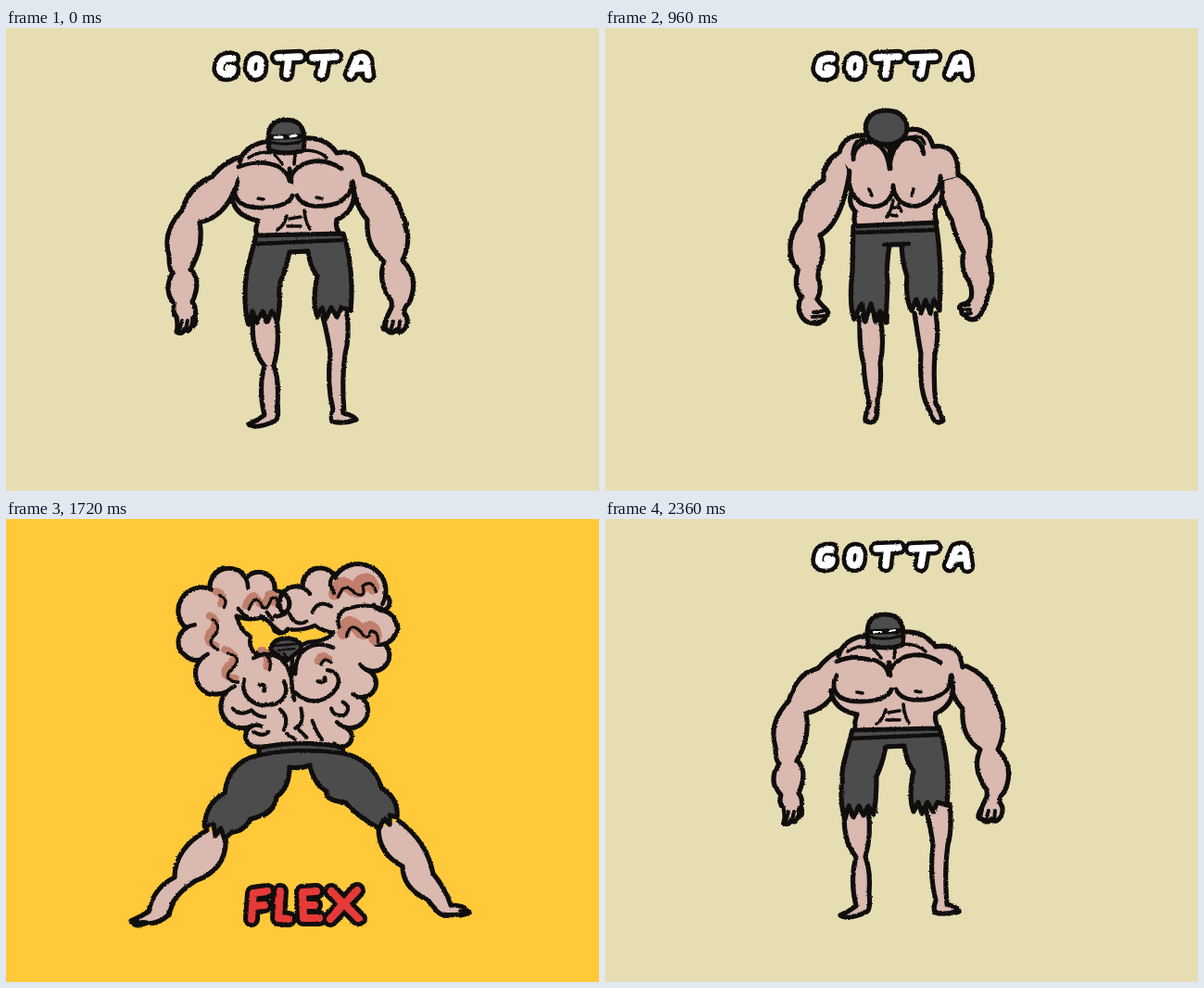
Recreate the animation shown at these times as an HTML page. Size 640 px wide and 500 px high, loop 2440 ms.

```html
<!DOCTYPE html>
<html lang="en">
<head>
<meta charset="utf-8">
<title>Gotta flex</title>
<style>
html, body { margin: 0; width: 100%; height: 100%; overflow: hidden; background: #e6ddb3; }
svg { display: block; width: 100%; height: 100%; }
path { stroke-linecap: round; stroke-linejoin: round; }
</style>
</head>
<body>
<svg viewBox="0 0 640 500" role="img" aria-label="Gotta flex">
  <defs>
    <filter id="crayon" filterUnits="userSpaceOnUse" x="0" y="0" width="640" height="500" color-interpolation-filters="sRGB">
      <feTurbulence id="wave" type="fractalNoise" baseFrequency=".03" numOctaves="1" result="wave"/>
      <feTurbulence id="grain" type="fractalNoise" baseFrequency=".5" numOctaves="1" result="grain"/>
      <feDisplacementMap in="SourceGraphic" in2="wave" scale="2.5" xChannelSelector="R" yChannelSelector="G" result="soft"/>
      <feDisplacementMap in="soft" in2="grain" scale="2.4" xChannelSelector="R" yChannelSelector="G"/>
    </filter>
  </defs>
  <rect id="back" width="640" height="500"/>
  <g id="art" filter="url(#crayon)"></g>
</svg>
<script>
const LOOP = 2440;
const INK = '#100e0d', SKIN = '#d9b9b0', GREY = '#4c4c4c', VEIN = '#c07f6c';
const BEIGE = '#e6ddb3', YELLOW = '#ffc93a', RED = '#e63a38';
const $ = id => document.getElementById(id);

// Drawing helpers
const shape = (d, fill, w = 5.2) => `<path d="${d}" fill="${fill}" stroke="${INK}" stroke-width="${w}"/>`;
const line = (d, w = 4.4, color = INK) => `<path d="${d}" fill="none" stroke="${color}" stroke-width="${w}"/>`;
const move = (x, y, s) => `<g transform="translate(${x} ${y})">${s}</g>`;
const lettering = (d, color, w, edge) => line(d, w + edge, INK) + line(d, w, color);

// Blend two paths that share the same commands
function mix([a, b], k) {
  const to = b.match(/-?[\d.]+/g);
  let i = 0;
  return a.replace(/-?[\d.]+/g, n => (+n + (to[i++] - n) * k).toFixed(1));
}

// Clockwise corner points joined by round bumps, each curling inward at its end
function bumps(text, curl) {
  const n = text.split(' ').map(Number);
  let d = `M${n[0]} ${n[1]}`, curls = '';
  for (let i = 2; i < n.length; i += 2) {
    const [px, py, x, y] = n.slice(i - 2, i + 2);
    const r = .51 * Math.hypot(x - px, y - py);
    const cx = (px + x) / 2 - (y - py) * .1, cy = (py + y) / 2 + (x - px) * .1;
    const a = Math.atan2(y - cy, x - cx) + curl / r;
    d += `A${r} ${r} 0 0 1 ${x} ${y}`;
    curls += `M${x} ${y}A${r} ${r} 0 0 1 ${cx + r * Math.cos(a)} ${cy + r * Math.sin(a)}`;
  }
  return shape(d + 'Z', SKIN, 5) + line(curls);
}

// Standing figure: upright and slumped
const stand = {
  armL: [
    'M262 138Q240 139 222 161Q198 169 190 197Q168 220 176 246Q176 262 180 264Q169 284 182 298Q179 306 184 312Q186 322 184 328Q190 332 193 325Q197 330 200 322Q206 322 204 312Q206 302 201 296Q208 280 205 270Q202 262 199 261Q214 236 209 210Q238 204 250 166Z',
    'M258 132Q234 142 236 164Q211 180 211 208Q193 230 204 256Q209 260 208 263Q203 280 212 291Q206 302 212 311Q216 319 226 319Q232 320 233 317Q238 316 238 311Q243 310 239 304Q234 300 229 293Q235 280 230 270Q230 264 231 260Q239 240 232 224Q255 212 264 156Z'],
  fingersL: [
    'M190 316L187 327M196 316L194 325M201 313L201 321',
    'M225 307L239 305M224 312L237 311M226 317L233 317'],
  armR: [
    'M378 156Q418 164 427 200Q440 226 428 251Q447 270 435 297Q429 302 430 308Q435 314 432 322Q426 332 421 326Q416 332 411 326Q404 326 409 317Q413 308 416 302Q417 294 414 292Q400 270 409 251Q388 238 390 207Q376 192 374 165Z',
    'M381 158Q404 172 408 205Q420 222 414 245Q422 270 413 290Q411 300 407 306Q404 314 396 315Q390 314 389 310Q384 310 385 305Q380 300 387 298Q392 297 395 292Q397 284 393 274Q383 260 387 242Q378 225 374 207Q362 190 364 163Z'],
  fingersR: [
    'M411 316L409 324M418 317L415 327M425 317L424 327',
    'M385 299L393 299M386 304L394 304M389 309L395 308'],
  legL: [
    'M267 312Q263 345 279 365Q272 390 279 418Q271 424 262 428Q270 434 291 424Q295 420 293 405Q295 380 289 365Q296 340 292 314',
    'M275 312Q274 345 279 362Q280 385 286 408Q280 418 281 424Q288 428 292 423Q295 415 294 402Q299 385 297 362Q302 340 297 312'],
  legR: [
    'M342 312Q348 335 350 352Q346 385 353 412Q350 420 352 425Q365 428 378 423Q376 419 365 416Q362 380 366 352Q371 335 368 308',
    'M334 308Q338 335 341 352Q339 385 346 404Q351 415 356 424Q360 428 365 424Q364 415 357 406Q354 380 356 352Q361 335 357 308'],
  shorts: [
    'M270 224L364 222Q376 260 372 305L362 302L357 312L351 302L345 314L341 302L336 312Q330 295 336 268Q328 258 326 241L306 242Q302 262 296 274Q296 300 293 315L287 306L282 316L277 306L271 318L266 306L262 320Q255 300 260 262Z',
    'M268 214L357 210Q364 250 361 305L355 294L351 308L346 294L341 308L336 293L331 305Q324 295 326 268Q321 255 320 234L307 234Q303 262 305 274Q304 300 303 318L297 306L292 316L287 298L281 316L277 298L269 314Q263 300 267 262Z'],
  belt: ['M270 233L364 229M306 242L326 241', 'M269 221L358 218M301 234L328 233'],
  torso: [
    'M250 150Q258 124 284 122L322 119Q346 118 357 135Q382 130 386 158L374 168Q381 196 357 207Q354 215 363 226L270 228Q276 214 270 208Q243 202 244 182L250 166Z',
    'M252 136Q258 114 280 116L327 110Q348 106 354 128Q382 124 381 160L362 165Q367 190 357 193Q352 203 356 211L270 213Q272 203 270 200Q268 190 266 180L264 155Z'],
  sides: [
    'M252 145Q257 126 284 122M322 119Q346 118 357 135Q382 130 386 157M374 166Q381 196 357 207M357 207Q355 215 360 222M244 182Q246 203 272 208Q268 218 271 224',
    'M253 134Q258 115 280 116M327 110Q348 106 354 128Q382 124 381 159M362 165Q368 190 357 193M357 193Q355 203 358 210M266 178Q262 190 270 198Q268 206 270 212'],
  chest: [
    'M250 151C270 142 302 146 306 165C312 142 342 138 362 152M249 166C240 190 262 195 278 194C296 194 307 188 309 181M314 181C320 194 336 193 345 192C362 190 373 182 373 167M306 152L308 166',
    'M268 142C268 118 303 112 307 152C310 112 340 110 344 136M264 155C260 180 276 193 290 193C304 192 311 182 311 170M311 170C312 186 324 194 338 192C352 188 362 174 362 160M307 130L308 152'],
  marks: [
    'M272 184L278 185M335 183L341 184M303 203Q300 214 293 218M322 197Q323 210 328 217M306 206L318 204M304 214L318 214M262 140Q275 132 285 135M322 132Q338 132 346 140M290 137L298 147M312 137L311 147',
    'M285 174L288 181M333 174L331 181M311 186Q309 198 304 204M317 190Q317 194 320 198M310 194L316 194M309 202L315 203M267 137Q268 120 280 120M327 120Q340 112 345 125M300 124L304 129M312 126L308 130'],
  head: [
    'M284 132C281 110 285 99 302 99C320 99 324 112 321 132Q303 138 284 132Z',
    'M285 119C276 105 284 89 303 89C324 89 331 106 322 119Q304 133 285 119Z']
};
const GOTTA = 'M245 33Q232 31 231 42Q229 50 238 50Q245 50 245 44L240 43M270 33Q264 34 264 42Q263 50 270 50Q275 49 275 41Q276 33 270 33M293 32L317 31M305 32L303 50M331 32L356 31M344 32L341 50M372 50L379 33Q386 29 389 35L391 51M376 44L389 43';

// k: slump, s: sway, lid: eye opening
function standing(k, s = 0, lid = 3) {
  const p = {};
  for (const name in stand) p[name] = mix(stand[name], k);
  const eyes = k > .45 ? '' :
    line('M288 118L317 117', 6) + line('M290 118L298 118M307 117L313 116', lid, '#fff') + line('M285 123Q302 128 320 122', 3);
  return move(8 * s, 0, shape(p.armL, SKIN) + line(p.fingersL, 4)) +
    move(-4 * s, -2 * s, shape(p.armR, SKIN) + line(p.fingersR, 4)) +
    move(-8 * s, 0, shape(p.legL, SKIN)) +
    move(4 * s, 0, shape(p.legR, SKIN)) +
    move(0, 3 * s, `<path d="${p.torso}" fill="${SKIN}"/>` + line(p.sides, 5.2)) +
    move(-3 * s, 4 * s, shape(p.shorts, GREY) + line(p.belt)) +
    move(0, 4 * s, shape(p.head, GREY) + eyes) +
    move(0, 3 * s, line(p.chest, 4.8) + line(p.marks, 3.6)) +
    lettering(GOTTA, '#fff', 7.5, 9);
}

// Flexing figure: arms raised and crouched
const wide = {
  legL: [
    'M217 336Q182 356 182 387Q159 398 154 424Q144 430 135 434Q140 442 152 437Q165 437 175 428Q178 408 204 391Q240 378 237 342',
    'M186 346Q166 365 168 384Q150 398 152 418Q136 424 128 429Q134 437 146 434Q158 432 161 426Q164 412 187 392Q206 370 208 348'],
  legR: [
    'M402 334Q402 362 428 375Q428 398 454 411Q464 425 472 428Q490 430 500 425Q495 418 480 418Q474 398 461 383Q454 348 424 326',
    'M426 328Q428 357 454 368Q460 396 480 408Q486 424 494 427Q506 428 514 423Q508 416 496 414Q486 395 467 363Q462 340 444 320'],
  shorts: [
    'M273 247Q318 238 363 246L364 253Q396 260 405 290Q424 302 422 322L414 320L414 330L408 324L403 334Q380 322 366 306Q344 304 346 294Q332 286 328 266Q318 270 306 268Q306 290 292 300Q290 318 264 324Q256 338 244 338L236 346L232 334L226 342L224 330L214 332Q216 306 236 296Q240 262 273 255Z',
    'M300 266Q318 260 336 264L345 271Q400 264 425 285Q446 298 444 322L436 316L432 328L424 318L415 328Q400 312 378 308Q362 304 352 295Q342 296 328 290Q318 295 306 290Q296 298 278 302Q262 320 236 324Q218 330 216 342L208 348L204 338L196 346L190 336L182 343Q186 310 204 300Q225 285 290 272Z'],
  belt: ['M274 255Q318 246 363 253', 'M305 266Q318 260 332 266'],
  toes: ['M137 434L150 436M490 424L499 425', 'M130 430L141 433M504 422L512 423']
};
const RAISED = bumps('272 246 266 224 240 187 212 153 197 119 222 77 260 66 290 80 300 104 320 76 354 64 407 84 402 100 406 136 388 164 382 193 364 225 362 246', 10);
const HOLE = 'M250 106Q262 112 276 108Q288 112 290 122Q298 128 304 120Q318 123 333 116Q340 122 352 124Q346 133 326 134Q314 138 306 150Q282 148 270 147Q262 138 265 128Q254 122 250 106Z';
const VEINS = 'M222 106Q233 112 225 122Q214 132 228 138M238 142Q254 148 241 160Q232 170 248 173M229 80Q239 83 234 93M260 95Q268 76 274 92Q280 98 284 82Q292 80 290 92M276 143Q285 148 282 160M336 154Q340 145 347 152';
const THICK = 'M353 82Q360 64 372 78Q384 84 380 70Q390 62 394 76M363 124Q366 106 378 118Q386 131 388 118Q397 118 396 130';
const FLEXED = 'M268 152C282 144 302 148 307 170M312 168C312 138 334 132 352 140M258 174C254 190 266 203 284 202C300 200 306 188 300 176M274 180Q282 178 279 186M312 188C326 202 342 198 352 188C362 176 358 166 346 164M336 176Q345 178 343 172M309 152Q306 175 311 196';
const RIPPLES = 'M246 205Q254 214 266 207Q272 214 280 214M362 198Q372 204 364 212Q352 214 350 205M318 205Q322 222 312 226M296 206Q306 214 300 228M330 218Q334 230 340 238M303 232L312 238M316 228L324 236M268 230Q278 236 284 230M330 102Q336 88 350 96M352 82Q344 68 356 60M358 118Q354 102 368 98Q386 92 403 98M306 104Q312 118 324 112M252 98Q256 104 262 108M276 106L284 112M282 102L288 110M288 116L296 123';

const CROUCHED = bumps('308 258 248 257 238 201 269 164 312 172 322 166 358 160 393 189 391 238 387 257 334 262', 8);
const PRESSED = 'M262 234Q290 248 316 232Q340 246 362 228M272 190Q292 178 308 186Q314 195 315 209M315 208Q316 194 326 188Q346 180 358 192M258 203Q270 225 262 245M242 210Q236 224 244 236M252 248Q262 238 275 256Q285 262 292 254M288 251Q300 245 308 254Q311 262 304 268M360 208Q368 200 374 212M360 190Q354 206 372 212Q378 228 368 240M388 208Q396 224 386 240M374 242Q364 236 356 250M352 250Q338 238 331 250Q324 262 334 270';
const SMALL = 'M278 180Q288 172 300 176M334 176Q342 170 350 174M290 240Q296 250 306 246M308 246L318 240L326 246M314 250L320 246M338 244L344 252M294 252L300 258M302 251L304 258M334 252L340 256M378 252Q378 260 370 266M254 256Q258 264 266 266';

const FLEX = 'M265 432L267 404L282 402M266 418L279 417M296 402L294 431L305 432M335 402L320 403L321 431L338 431M320 417L333 417M351 402L381 432M379 401L350 432';

const raised = puff => `<g transform="translate(305 246) scale(${1 + .025 * puff} ${1 + .01 * puff}) translate(-305 -246)">` +
  RAISED + shape(HOLE, YELLOW, 4.4) +
  shape('M286 144Q287 130 303 130Q320 131 318 142L303 154Z', GREY, 4.6) +
  line('M290 138L314 136M294 143L311 141M300 146L304 152', 2.6) +
  line(VEINS, 8, VEIN) + line(THICK, 14, VEIN) + move(3, 4, line(VEINS + THICK, 3.2)) +
  line(FLEXED) + line(RIPPLES, 4) + '</g>';

const crouched = dy => move(0, dy, CROUCHED +
  shape('M300 179Q316 170 332 178Q324 196 316 196Q308 190 300 179Z', GREY, 4) +
  line(PRESSED) + line(SMALL, 3.6) + shape('M264 240L270 236L268 244Z', YELLOW, 2.4));

function drops(list, cx, cy, f) {
  return list.map(([x, y, a]) => {
    const px = cx + (x - cx) * f, py = cy + (y - cy) * f;
    return `<g transform="translate(${px} ${py}) rotate(${a})">` + shape('M-4 0Q0 -4 5 1Q0 3 -4 0Z', INK, 2.6) + '</g>';
  }).join('');
}
const BURST = [[173, 86, 15], [435, 85, -15], [211, 223, -25], [424, 217, 50]];
const SPRAY = [[231, 63, 5], [357, 50, 8], [380, 95, 25]];

// low: 0 arms raised, 1 crouched
function flexing(low, puff, weight, extra = '') {
  const p = {};
  for (const name in wide) p[name] = mix(wide[name], low);
  const legs = shape(p.legL, SKIN) + shape(p.legR, SKIN) + line(p.toes, 3.6);
  const shorts = shape(p.shorts, GREY) + line(p.belt);
  const body = low < .5 ? move(0, 22 * low, raised(puff)) + shorts : shorts + crouched(puff);
  return legs + body + extra + lettering(FLEX, RED, weight, 10);
}

// Poses in time: [start, draw]
const poses = [];
const slump = [0, -.02, -.04, -.06, -.08, -.07, -.04, 0, .08, .25, .55, .85, 1, 1.04];
slump.forEach((k, i) => poses.push([i * 80, () => standing(k, 0, i > 3 && i < 7 ? 2 : 3)]));

const weights = [10.5, 8, 14];
const shakes = [[1120, -2], [1200, 1.6], [1280, .2], [1360, 1], [1400, .6], [1440, 0], [1480, 1], [1520, .1], [1560, 1], [1640, 0], [1720, 1]];
shakes.forEach(([t, puff], i) => {
  const far = 1 + (t - 1440) / 210;
  const sweat = t >= 1360 && t < 1640 ? drops(BURST, 305, 150, far) : '';
  poses.push([t, () => flexing(0, puff, weights[i % 3], sweat)]);
});

const sinks = [[1800, .4, -.5], [1880, 1.08, 7], [1960, 1.02, 3], [2040, .98, -1], [2120, 1.01, 1], [2160, .99, -1], [2240, 1, 0]];
sinks.forEach(([t, low, puff], i) => {
  const far = 1 - (2240 - t) / 500;
  const sweat = t >= 1960 ? drops(SPRAY, 312, 170, far) : '';
  poses.push([t, () => flexing(low, puff, weights[i % 3], sweat)]);
});
poses.push([2320, () => standing(-.3, .5, 2)], [2360, () => standing(0, 1, 2)]);

let shown = -1;
function draw(now) {
  const t = now % LOOP;
  let i = poses.length - 1;
  while (poses[i][0] > t) i--;
  if (i !== shown) {
    shown = i;
    const start = poses[i][0];
    $('back').setAttribute('fill', start >= 1120 && start < 2320 ? YELLOW : BEIGE);
    $('wave').setAttribute('seed', 3 + i % 4);
    $('grain').setAttribute('seed', 11 + i % 5);
    $('art').innerHTML = poses[i][1]();
  }
}
const begin = performance.now();
function tick() {
  draw(performance.now() - begin);
  requestAnimationFrame(tick);
}
tick();
</script>
</body>
</html>
```
